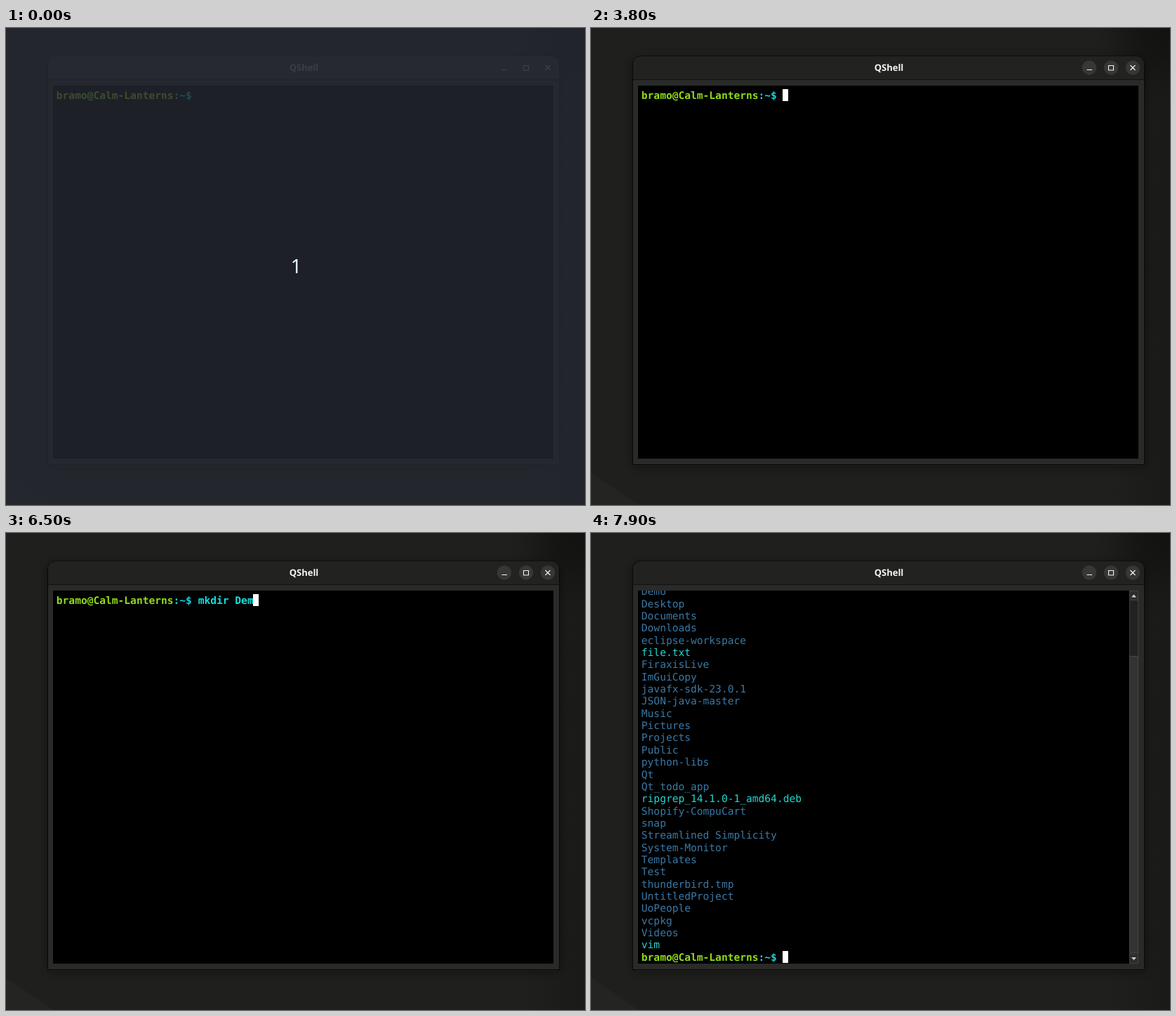
These frames come from a looping animation (825 by 679 pixels, 8 s). An HTML page:

```html
<!DOCTYPE html>
<html lang="en">
<head>
<meta charset="utf-8">
<title>QShell</title>
<style>
  html, body { margin: 0; width: 100%; height: 100%; overflow: hidden; background: #1e1e1c; }
  svg { display: block; width: 825px; height: 679px; }
  text { white-space: pre; text-rendering: geometricPrecision; }
  .mono { font: 14.58px "DejaVu Sans Mono", monospace; }
  .bold { font-weight: 700; }
  .user { fill: #90dc18; }
  .path { fill: #18d2d8; }
  .typed { fill: #0fe0df; }
  .dir { fill: #3a78a6; }
  .file { fill: #1fd8cf; }
  .title { font: 700 13px "Noto Sans", "Open Sans", sans-serif; text-anchor: middle; }
  .count { font: 28px "Open Sans", "Noto Sans", sans-serif; }
  .count text { mix-blend-mode: screen; }
</style>
</head>
<body>
<svg viewBox="0 0 825 679" xmlns="http://www.w3.org/2000/svg">
  <defs>
    <linearGradient id="side">
      <stop offset="0" stop-color="#131311" stop-opacity="0"/>
      <stop offset="1" stop-color="#131311" stop-opacity=".45"/>
    </linearGradient>
    <radialGradient id="corner" cx="825" cy="0" r="110" gradientUnits="userSpaceOnUse">
      <stop offset="0" stop-color="#121211"/>
      <stop offset=".4" stop-color="#131312" stop-opacity=".8"/>
      <stop offset="1" stop-color="#171716" stop-opacity="0"/>
    </radialGradient>
    <filter id="blur" x="-10%" y="-10%" width="120%" height="120%">
      <feGaussianBlur stdDeviation="7"/>
    </filter>
    <clipPath id="screen"><rect x="67" y="82" width="713" height="531"/></clipPath>
  </defs>

  <rect width="825" height="679" fill="#1f1f1d"/>
  <rect x="740" width="85" height="679" fill="url(#side)"/>
  <rect x="700" width="125" height="120" fill="url(#corner)"/>
  <path d="M0 633L68 679H0Z" fill="#242423"/>
  <rect x="60" y="44" width="729" height="580" rx="8" fill="#0c0c0b" opacity=".5" filter="url(#blur)"/>

  <path d="M59.5 621.5V51a11 11 0 0 1 11-11H777.5a11 11 0 0 1 11 11V621.5Z" fill="#2a2a29" stroke="#080807"/>
  <path id="bar" d="M60 73V51a10.5 10.5 0 0 1 10.5-10.5H777.5a10.5 10.5 0 0 1 10.5 10.5V73Z"/>
  <rect x="60" y="73" width="728" height="1" fill="#111110"/>
  <text id="title" class="title" x="424.5" y="61">QShell</text>
  <g id="discs" fill="#373736">
    <circle cx="710" cy="56.5" r="10.2"/>
    <circle cx="741" cy="56.5" r="10.2"/>
    <circle cx="772" cy="56.5" r="10.2"/>
  </g>
  <path id="icons" d="M706.5 59.5H714M737.5 53.5H744.5V60H737.5ZM768.5 53L775.5 60M775.5 53L768.5 60" fill="none" stroke-width="1.1"/>

  <rect x="67" y="82" width="713" height="531" fill="#000"/>
  <g clip-path="url(#screen)">
    <g id="session" class="mono"></g>
    <g id="listing" class="mono"></g>
    <rect id="caret" width="8" height="17" fill="#fff"/>
  </g>

  <g id="scroll">
    <rect x="767" y="82" width="13" height="531" fill="#222221"/>
    <path d="M767.5 82V613M779.5 82V613" stroke="#3c3c3b"/>
    <rect x="767.5" y="82.5" width="12" height="13" fill="#2d2d2c" stroke="#414140"/>
    <rect x="767.5" y="599.5" width="12" height="13" fill="#2d2d2c" stroke="#414140"/>
    <rect x="767.5" y="175.5" width="12" height="422" fill="#333332" stroke="#464645"/>
    <path d="M770 91.5L773.5 87.5L777 91.5ZM770 604L773.5 608L777 604Z" fill="#d0d0cf"/>
  </g>

  <g id="overlay">
    <rect width="825" height="679" fill="#262932" opacity=".8"/>
    <g class="count">
      <text x="405.8" y="349" fill="#f00">1</text>
      <text x="405.4" y="349" fill="#0f0">1</text>
      <text x="405" y="349" fill="#00f">1</text>
    </g>
  </g>
</svg>
<script>
const NS = "http://www.w3.org/2000/svg";
const LOOP = 8000;
const LEFT = 71.8, LINE = 17.34, CELL = 8.79;
const FIRST = 100.6, LAST = 608.6;
const PROMPT = [["bramo@Calm-Lanterns", "user"], [":~$ ", "path"]];
const PROMPT_LEN = 23;
const FOCUS = 2600, BLINK = 600, PROMPT2 = 7100, OUTPUT = 7900;

// each command with the time of every keystroke
const commands = [
  { text: "mkdir Demo", keys: [5200, 5400, 5500, 5700, 5800, 6000, 6300, 6400, 6500, 6700] },
  { text: "ls", keys: [7600, 7700] }
];
const plainFiles = ["file.txt", "ripgrep_14.1.0-1_amd64.deb", "vim"];
const entries = `Demo
Desktop
Documents
Downloads
eclipse-workspace
file.txt
FiraxisLive
ImGuiCopy
javafx-sdk-23.0.1
JSON-java-master
Music
Pictures
Projects
Public
python-libs
Qt
Qt_todo_app
ripgrep_14.1.0-1_amd64.deb
Shopify-CompuCart
snap
Streamlined Simplicity
System-Monitor
Templates
Test
thunderbird.tmp
UntitledProject
UoPeople
vcpkg
Videos
vim`.split("\n");

const $ = id => document.getElementById(id);
const show = (el, on) => el.setAttribute("display", on ? "inline" : "none");

function add(parent, tag, attrs, text = "") {
  const el = document.createElementNS(NS, tag);
  for (const name in attrs) el.setAttribute(name, attrs[name]);
  el.textContent = text;
  return parent.appendChild(el);
}

function addPrompt(parent, y) {
  const row = add(parent, "text", { x: LEFT, y, class: "bold" });
  for (const [text, cls] of PROMPT) add(row, "tspan", { class: cls }, text);
  return { row, typed: add(row, "tspan", { class: "typed" }) };
}

const ui = {};
for (const id of ["bar", "title", "discs", "icons", "session", "listing", "caret", "scroll", "overlay"]) ui[id] = $(id);

const rows = commands.map((c, i) => addPrompt(ui.session, FIRST + i * LINE));
entries.forEach((name, i) => add(ui.listing, "text", {
  x: LEFT,
  y: LAST - (entries.length - i) * LINE,
  class: plainFiles.includes(name) ? "file" : "dir"
}, name));
addPrompt(ui.listing, LAST);

function draw(t) {
  const focused = t >= FOCUS, listed = t >= OUTPUT;
  const active = t >= PROMPT2 ? 1 : 0;

  show(ui.overlay, t < 500);
  show(ui.discs, focused);
  ui.bar.setAttribute("fill", focused ? "#222221" : "#2b2b2a");
  ui.title.setAttribute("fill", focused ? "#f5f5f4" : "#939391");
  ui.icons.setAttribute("stroke", focused ? "#f5f5f4" : "#aaaaa8");

  show(ui.session, !listed);
  show(ui.listing, listed);
  show(ui.scroll, listed);
  show(rows[1].row, active === 1);

  const counts = commands.map(c => c.keys.filter(k => t >= k).length);
  commands.forEach((c, i) => { rows[i].typed.textContent = c.text.slice(0, counts[i]); });

  const col = PROMPT_LEN + (listed ? 0 : counts[active]);
  ui.caret.setAttribute("x", Math.floor(71.7 + col * CELL));
  ui.caret.setAttribute("y", listed ? 595 : 87 + active * 17);
  show(ui.caret, focused && Math.floor((t - FOCUS) / BLINK) % 2 === 0);
}

function tick() {
  draw(performance.now() % LOOP);
  requestAnimationFrame(tick);
}
tick();
</script>
</body>
</html>
```
